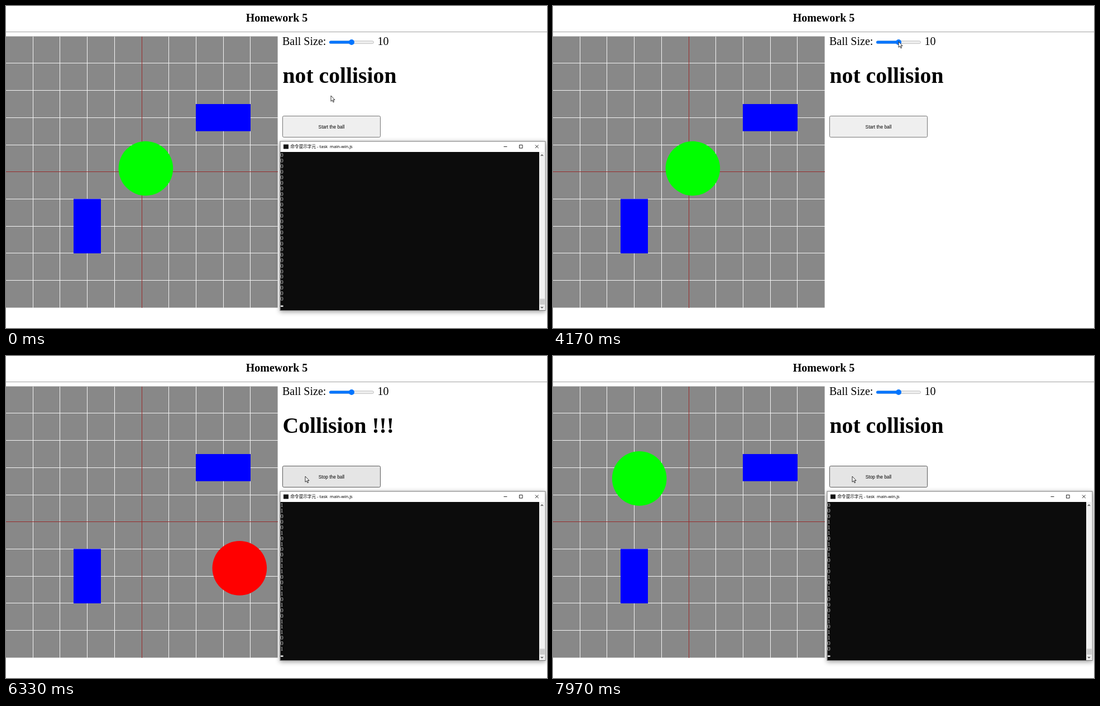
These frames come from a looping animation (969x578 px, 8000 ms). An HTML page:

```html
<!DOCTYPE html>
<html lang="en">
<head>
<meta charset="utf-8">
<title>Ball</title>
<style>
  html, body { margin: 0; width: 100%; height: 100%; overflow: hidden; background: #fff; }
  svg { display: block; }
  .serif { font-family: "Liberation Serif", serif; }
  .sans { font-family: "Liberation Sans", sans-serif; }
  .bold { font-weight: bold; }
  .crisp { shape-rendering: crispEdges; }
  #win > .frame { filter: drop-shadow(0 2px 4px rgba(0, 0, 0, .4)); }
</style>
</head>
<body>
<svg width="969" height="578" viewBox="0 0 969 578">
  <g class="serif">
    <text class="bold" x="485" y="27.5" font-size="20" text-anchor="middle">Homework 5</text>
    <text x="495" y="70" font-size="20">Ball Size:</text>
    <text x="665.5" y="70" font-size="20">10</text>
    <text id="status" class="bold" x="495.5" y="138" font-size="39.7"></text>
  </g>
  <rect class="crisp" y="46" width="969" height="1" fill="#a0a0a0"/>

  <rect y="54.5" width="486.6" height="487" fill="#888"/>
  <g id="grid" class="crisp"></g>
  <g fill="#00f">
    <rect x="340" y="176" width="98" height="48.7"/>
    <rect x="121" y="346.3" width="49" height="97.7"/>
  </g>
  <circle id="ball"/>

  <rect x="579.5" y="62.8" width="79" height="4.6" rx="2.3" fill="#efefef" stroke="#b2b2b2" stroke-width=".8"/>
  <rect id="fill" x="579" y="62.4" height="5.2" rx="2.6"/>
  <circle id="thumb" cy="65" r="5"/>

  <rect id="button" x="495.5" y="197.5" width="175" height="38" rx="2"/>
  <text id="label" class="sans" x="583" y="219.6" font-size="8.35" text-anchor="middle"></text>

  <g id="win">
    <rect class="frame" x="491" y="243" width="475" height="303.5" fill="#fff" stroke="#777" stroke-width="1"/>
    <rect x="491.5" y="262" width="463.5" height="284" fill="#0c0c0c"/>
    <rect x="955" y="262" width="10.5" height="284" fill="#f0f0f0"/>
    <rect x="956" y="525.5" width="9" height="10.5" fill="#cdcdcd"/>
    <rect x="497" y="248.5" width="9" height="8" fill="#111"/>
    <text x="509.5" y="255.4" font-size="7.6" font-family="'Noto Sans CJK TC','Noto Sans CJK',sans-serif">命令提示字元</text>
    <text x="555" y="255.4" font-size="7.6" font-family="'Noto Sans',sans-serif" xml:space="preserve"> - task  main-win.js</text>
    <g fill="none" stroke="#111" stroke-width=".9">
      <path d="M891.5 252.5h6M919.5 249.5h5.6v5.6h-5.6zM948 249.5l5.6 5.6m0-5.6l-5.6 5.6"/>
      <path d="M958 269l2-2 2 2M958 540l2 2 2-2" stroke="#444" stroke-width="1.2"/>
    </g>
    <g id="lines" class="serif" font-size="11" fill="#ccc"></g>
    <rect id="caret" x="492" y="537.5" width="4.5" height="2.5" fill="#eee"/>
  </g>

  <g id="pointer">
    <circle id="press" cy="1" r="7" fill="#ffea00" opacity=".5"/>
    <path d="M0 0V10.2L2.4 8 4 11.8 5.6 11.1 4 7.5H7z" fill="#fff" stroke="#000" stroke-width=".8"/>
  </g>
</svg>
<script>
const LOOP = 8000, PRESS = 1540, RELEASE = 4170, START = 4540;
const UNIT = 4.87;                        // ball radius per slider unit
const ROWS = 27, ROW_MS = 60, LOG_START = 4890, LEAD = 6;

const LOG = "010011" +
  "011100100110110010011010110" +
  "001010011100110100111001" +
  "000111010101010" + "110001101100";

const POINTER = [
  [0, 582, 161], [740, 582, 161], [1540, 618, 64], [1590, 618, 64],
  [1680, 603, 64], [1930, 584, 66], [2330, 584, 66], [3090, 639, 69],
  [3450, 639, 69], [4030, 619, 64], [4540, 619, 64]
];
const HITS = [[4753, 4850], [4915, 5330], [5775, 5950], [6248, 6500], [7486, 7880]];

const $ = id => document.getElementById(id);
const set = (el, attrs) => { for (const k in attrs) el.setAttribute(k, attrs[k]); };
const add = (parent, tag, attrs) => {
  const el = document.createElementNS("http://www.w3.org/2000/svg", tag);
  set(el, attrs);
  return parent.appendChild(el);
};

for (const color of ["#f4f4f4", "#972c2c"]) {
  for (let k = 1; k < 10; k++) {
    if ((k === 5) !== (color === "#972c2c")) continue;
    add($("grid"), "rect", { x: Math.floor(48.7 * k - .5), y: 54.5, width: 1, height: 487, fill: color });
    add($("grid"), "rect", { x: 0, y: Math.floor(54.25 + 48.7 * k), width: 486.6, height: 1, fill: color });
  }
}
const rows = Array.from({ length: ROWS }, (_, i) =>
  add($("lines"), "text", { x: 491.2, y: 271 + 9.93 * i }));

function pointerAt(t) {
  if (t >= START) return [536, 216];
  const i = POINTER.findIndex(p => p[0] > t);
  const [t0, x0, y0] = POINTER[i - 1], [t1, x1, y1] = POINTER[i];
  const k = (t - t0) / (t1 - t0);
  return [x0 + (x1 - x0) * k, y0 + (y1 - y0) * k];
}

// Bounce a straight run between two walls.
function bounce(d, lo, hi) {
  const span = hi - lo, m = ((d % (2 * span)) + 2 * span) % (2 * span);
  return lo + (m > span ? 2 * span - m : m);
}

function ballAt(t) {
  if (t < START) return [250.4, 291.6];
  // the run slows a little in the middle stretch
  const s = t - 4890 - .166 * Math.min(Math.max(t - 5330, 0), 1000);
  return [bounce(39.8 + .29 * s, 48.7, 438.3), bounce(194.1 + .2402 * s, 103.4, 492.3)];
}

function drawLog(t) {
  const running = t >= START;
  const age = t - LOG_START;
  const top = LEAD + Math.floor(age / ROW_MS);
  const phase = ((age % ROW_MS) + ROW_MS) % ROW_MS;
  const scrolling = running && phase >= 5 && phase < 15;
  rows.forEach((row, i) => {
    row.textContent = !running ? "0" : scrolling && i === ROWS - 1 ? "" : LOG[top + i] || "0";
  });
  $("caret").style.display = scrolling ? "none" : "";
}

function draw(t) {
  const running = t >= START, held = t >= PRESS && t < RELEASE;
  const [px, py] = pointerAt(t);
  const size = held ? Math.max(5, Math.min(15, Math.round(5 + (px - 584) / 7))) : 10;
  const hit = HITS.some(([a, b]) => t >= a && t < b);
  const [cx, cy] = ballAt(t);

  set($("ball"), { cx, cy, r: UNIT * size + .1, fill: hit ? "#f00" : "#0f0" });
  $("status").textContent = hit ? "Collision !!!" : "not collision";

  const thumbX = 584 + (size - 5) * 7, blue = held ? "#3793ff" : "#0075ff";
  set($("fill"), { width: thumbX - 579, fill: blue });
  set($("thumb"), { cx: thumbX, fill: blue });

  set($("button"), { fill: running ? "#e5e5e5" : "#efefef", stroke: running ? "#5a5a5a" : "#767676" });
  $("label").textContent = running ? "Stop the ball" : "Start the ball";

  $("win").style.display = t < PRESS || running ? "" : "none";
  drawLog(t);

  set($("pointer"), { transform: `translate(${px} ${py})` });
  $("press").style.display = held ? "" : "none";
}

const begin = performance.now();
function tick() {
  draw((performance.now() - begin) % LOOP);
  requestAnimationFrame(tick);
}
tick();
</script>
</body>
</html>
```
